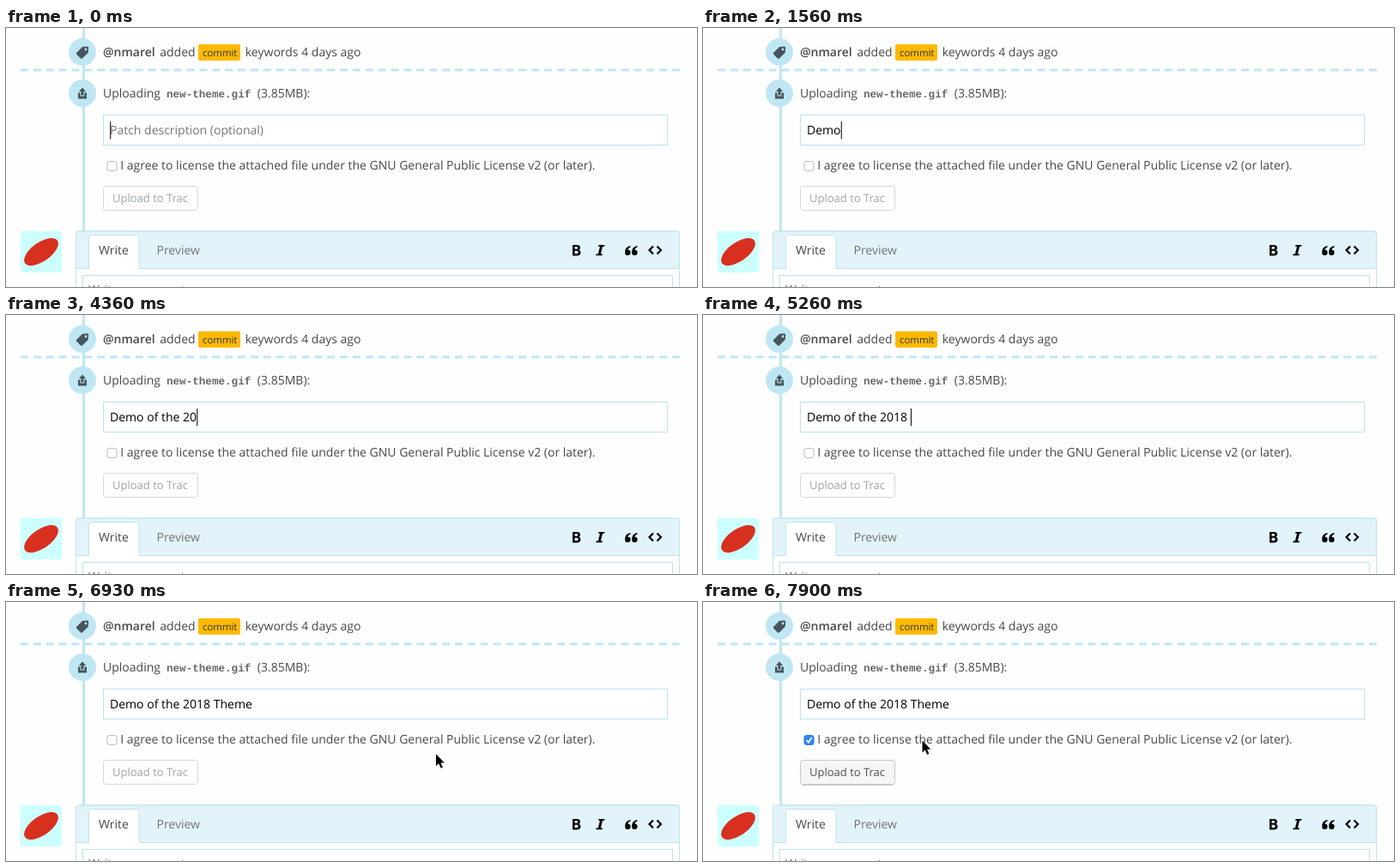
Recreate the animation shown at these times as an HTML page. Size 805 by 302 pixels, loop 8000 ms.

```html
<!DOCTYPE html>
<html lang="en">
<head>
<meta charset="utf-8">
<title>Patch upload form</title>
<style>
  html, body { margin: 0; width: 100%; height: 100%; overflow: hidden; background: #fefefe; }
  svg { display: block; font: 14px "Open Sans", sans-serif; fill: #484848; text-rendering: geometricPrecision; }
  text { white-space: pre; }
  .timeline { fill: #bfe7f3; }
  .box { fill: #fff; stroke: #bfe3ee; }
  .icon { fill: #46545b; }
  .muted { fill: #757575; }
  .button rect { fill: #fdfdfd; stroke: #d8d8d8; }
  .button text { font-size: 13px; fill: #a0a5aa; }
  .button.enabled rect { fill: #f6f6f6; stroke: #c8c8c8; }
  .button.enabled text { fill: #505050; }
  .button line { stroke: #ccc; visibility: hidden; }
  .button.enabled line { visibility: visible; }
</style>
</head>
<body>
<svg width="805" height="302" viewBox="0 0 805 302">
  <g class="timeline">
    <rect x="89" width="3" height="237"/>
    <path d="M17 49H785" stroke="#bfe7f3" stroke-width="3" stroke-dasharray="9 5.88"/>
    <circle cx="89" cy="28" r="16"/>
    <circle cx="89" cy="76" r="16"/>
  </g>
  <g class="icon">
    <path fill-rule="evenodd" d="M82 29l7-7 6-.5 1.2 1.2-.5 6-7 7h-1.5l-5.2-5.2zM91.6 25a1.4 1.4 0 1 0 2.8 0a1.4 1.4 0 1 0-2.8 0"/>
    <path d="M84 75.500h2.500v4h5v-4h2.500v7h-10z"/>
    <path d="M89 69.500l4 4.500h-2.500v4.500h-3v-4.500h-2.500z"/>
  </g>

  <text x="113" y="33" font-weight="600">@nmarel</text>
  <text x="179.2" y="33">added</text>
  <rect x="224" y="19" width="49" height="19" rx="2" fill="#ffb900"/>
  <text x="229" y="33" font-size="11.4" fill="#32373c">commit</text>
  <text x="278.8" y="33">keywords 4 days ago</text>

  <text x="113" y="81">Uploading</text>
  <text x="187" y="81" style="font:bold 12.6px 'Liberation Mono',monospace" fill="#666">new-theme.gif</text>
  <text x="292.8" y="81">(3.85MB):</text>

  <rect class="box" x="113.5" y="101.5" width="657" height="35"/>
  <text id="placeholder" class="muted" x="121" y="124">Patch description (optional)</text>
  <text id="typed" x="121" y="124" fill="#000" xml:space="preserve"></text>
  <rect id="caret" y="109" width="1" height="20.5" fill="#000"/>

  <rect id="checkbox" x="118" y="155.5" width="11" height="11" rx="2.5"/>
  <path id="tick" d="M120.7 161.2l2.2 2.6 3.8-5.9" fill="none" stroke="#fff" stroke-width="1.7"/>
  <text x="133.3" y="165">I agree to license the attached file under the GNU General Public License v2 (or later).</text>

  <g id="button" class="button">
    <rect x="113.5" y="184.5" width="110" height="28" rx="3"/>
    <line x1="115" y1="213.5" x2="222" y2="213.5"/>
    <text x="124" y="203">Upload to Trac</text>
  </g>

  <rect x="17" y="237" width="48" height="48" rx="2" fill="#cff"/>
  <ellipse cx="41" cy="261" rx="23" ry="11" transform="rotate(-35 41 261)" fill="#d8301f"/>

  <path class="box" d="M81.5 310V240a3 3 0 0 1 3-3H781.5a3 3 0 0 1 3 3V310z"/>
  <path d="M81.5 280.5V240a3 3 0 0 1 3-3H781.5a3 3 0 0 1 3 3V280.5z" fill="#e2f4f9" stroke="#bfe3ee"/>
  <path class="box" d="M96.5 281V244.5a3 3 0 0 1 3-3H152a3 3 0 0 1 3 3V281"/>
  <path d="M97 280.5H154.5" stroke="#fff" stroke-width="2"/>
  <text x="108" y="264">Write</text>
  <text x="175.5" y="264" class="muted">Preview</text>
  <g fill="#000">
    <path fill-rule="evenodd" d="M660 253h5q4 0 4 3.2q0 2-1.8 2.6q2.3.6 2.3 3q0 3.7-4.5 3.7h-5zM662.6 255v2.8h2q1.7 0 1.7-1.4t-1.7-1.4zM662.6 259.8v3.5h2.2q1.9 0 1.9-1.7t-1.9-1.8z"/>
    <path d="M690.5 253h7l-.4 1.800h-2.100l-2.200 8.700h2.100l-.4 1.800h-7.300l.4-1.800h2.200l2.200-8.700h-2.100z"/>
    <path id="quote" d="M727.5 254v1.5q-2.8.7-3 3.2a3.2 3.2 0 1 1-3.3 3.2q-.5-6.7 6.3-7.9z"/>
    <use href="#quote" x="8"/>
    <path d="M754 254.5l-4.5 4.5 4.5 4.5M758.5 254.5l4.5 4.5-4.5 4.5" fill="none" stroke="#000" stroke-width="2.2"/>
  </g>
  <rect class="box" x="89.5" y="288.5" width="687" height="30"/>
  <text x="96" y="309.5" class="muted">Write a comment...</text>

  <path id="pointer" d="M0 0V14l3.2-3 2.4 5.4 2.3-1-2.3-5.2h4.2z" fill="#000" stroke="#fff" paint-order="stroke"/>
</svg>
<script>
const LOOP = 8000;
const MESSAGE = "Demo of the 2018 Theme";
const KEY_TIMES = [900, 1140, 1290, 1560, 1770, 2010, 2340, 2660, 3050, 3410, 3520,
  3790, 4030, 4360, 4660, 4930, 5260, 5500, 5650, 5760, 5940, 6150];
const MOVE_START = 6690, MOVE_LENGTH = 700, PRESS = 7780, RELEASE = 7900;

const [placeholder, typed, caret, checkbox, tick, button, pointer] =
  ["placeholder", "typed", "caret", "checkbox", "tick", "button", "pointer"]
    .map(id => document.getElementById(id));

const show = (element, visible) => element.style.visibility = visible ? "visible" : "hidden";
const between = (t, start, end) => t >= start && t < end;

function drawInput(t) {
  const text = MESSAGE.slice(0, KEY_TIMES.filter(time => time <= t).length);
  if (typed.textContent !== text) typed.textContent = text;
  show(placeholder, !text);
  caret.setAttribute("x", 121.2 + (text ? typed.getComputedTextLength() : 0));
  show(caret, t < 60 || between(t, 660, MOVE_START) || between(t, 7290, PRESS));
}

function drawForm(t) {
  const checked = t >= RELEASE;
  const pressed = between(t, PRESS, RELEASE);
  checkbox.setAttribute("fill", checked ? "#2f86f6" : pressed ? "#e2e2e2" : "#fff");
  checkbox.setAttribute("stroke", checked ? "#287ae8" : pressed ? "#999" : "#bbb");
  show(tick, checked);
  button.classList.toggle("enabled", checked);
}

function drawPointer(t) {
  const elapsed = Math.min(t - MOVE_START, MOVE_LENGTH);
  const step = elapsed < 300 ? 60 : 50;
  const progress = Math.floor(elapsed / step) * step / MOVE_LENGTH;
  show(pointer, elapsed >= 0);
  if (elapsed < 0) return;
  const x = 255.5 + 545 * (1 - progress) ** 1.9;
  const y = 185.5 - 24 * progress;
  pointer.setAttribute("transform", `translate(${x} ${y})`);
}

const start = performance.now();
function frame() {
  const t = (performance.now() - start) % LOOP;
  drawInput(t);
  drawForm(t);
  drawPointer(t);
  requestAnimationFrame(frame);
}
frame();
</script>
</body>
</html>
```
